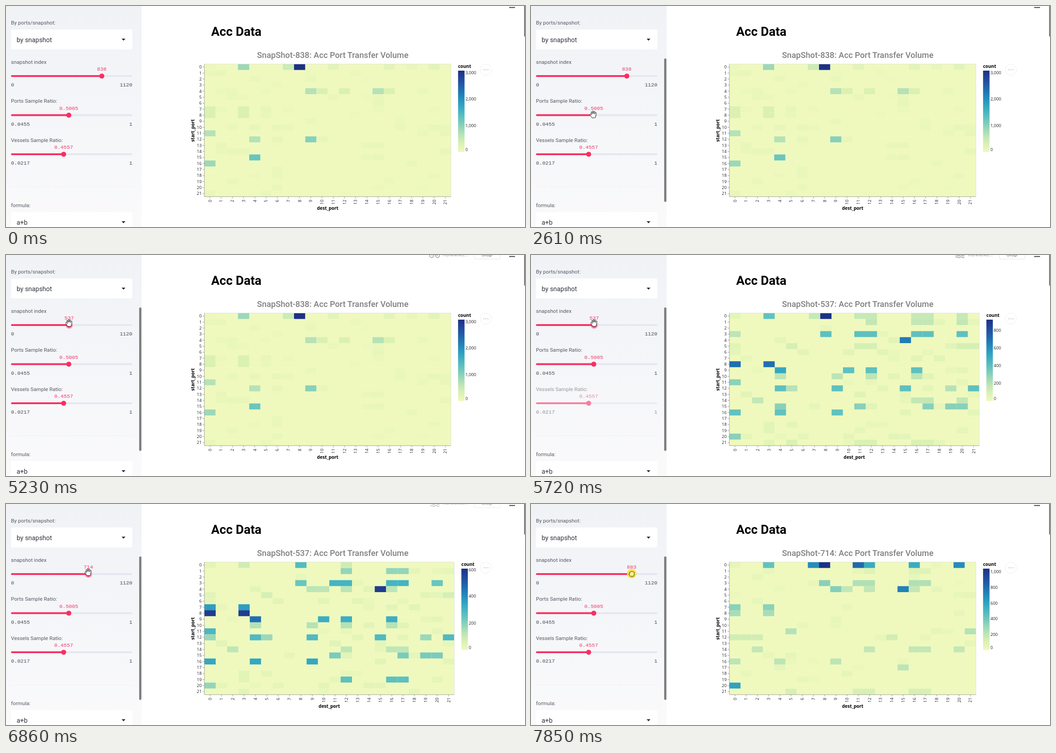
Write an HTML page that moves like this. It is 1146 px wide and 489 px high and loops after 8 s.

```html
<!DOCTYPE html>
<html lang="en">
<head>
<meta charset="utf-8">
<title>Acc Data</title>
<style>
html, body { margin: 0; width: 100%; height: 100%; overflow: hidden; background: #fff; }
svg { display: block; width: 1146px; height: 489px; }
text { font-family: Roboto, sans-serif; white-space: pre; }
.label { font-size: 11.6px; fill: #565863; }
.pick { font-size: 14.4px; fill: #31333f; }
.mono { font: 11.6px "Liberation Mono", monospace; fill: #4b4d58; }
.hot { fill: #ef3a6e; }
.axis text { font: 9.4px "Open Sans", sans-serif; fill: #222; }
.axis text.bold { font-size: 10px; font-weight: 700; fill: #000; }
.mid { text-anchor: middle; }
.end { text-anchor: end; }
</style>
</head>
<body>
<svg id="stage" viewBox="0 0 1146 489"></svg>
<script>
const LOOP = 8000, PINK = '#fa2f62';
const TOP = 128.4, LEFT = 438, N = 22, ROW = 13.34, BOTTOM = TOP + N * ROW;
const RAMP = ['#eff9bd', '#dbf1b4', '#bde5b5', '#94d5b9', '#69c5be', '#45b4c2',
  '#2c9ec0', '#2182b8', '#2163aa', '#23479c', '#1c3185'];

// Ports that trade with each other most; every lane is [strength, start, destinations]
const HUB = [12, 16, 17], EAST = [11, ...HUB], GATE = [0, 3], RING = [4, 9, 15, 21];
const CHARTS = [
  { at: 0, snap: 838, max: 3077, step: 1000, right: 982.5, faint: .03, lanes: [
    [.1, 4, [9, 10, ...HUB.slice(0, 2), 15]], [.22, 4, [9, 15]], [.1, 7, GATE], [.1, 8, GATE],
    [.06, 0, [11, 16, 20]], [.15, 0, [7]], [.28, 0, [3]], [1, 0, [8]], [.22, 11, [0]],
    [.22, 12, [4]], [.33, 12, [9]], [.4, 15, [4]], [.28, 16, [0]]] },
  { at: 5320, snap: 537, max: 922, step: 200, right: 989.8, faint: .06, lanes: [
    [.17, 0, [7, ...EAST, 20]], [.42, 0, [3]], [1, 0, [8]], [.18, 1, [...HUB, 20]],
    [.43, 3, [8, ...EAST, 20]], [.2, 3, [0]], [.72, 4, [15]], [.12, 5, [5, 11, 12, 20, 21]],
    [.76, 8, GATE], [.43, 9, [10, 12, 16]], [.56, 9, [4]], [.2, 10, [4, 9, 12, 16]],
    [.32, 11, [0]], [.22, 12, [5, 19]], [.43, 12, RING], [.18, 14, [2, 16, 17, 20]],
    [.33, 15, [4, 11, 17, 19, 20]], [.42, 16, [0, 4, 9]], [.33, 20, [0]], [.1, 21, [5, ...EAST]]] },
  { at: 6640, snap: 537, max: 605, step: 200, right: 989.8, faint: .06, lanes: [
    [.14, 0, [3, 12]], [.46, 0, [8]], [.3, 1, HUB], [.5, 3, EAST], [.4, 3, [8, 20]],
    [.2, 4, [9, 10, 12, 16]], [.95, 4, [15]], [.12, 5, [5, 21]], [.6, 7, GATE], [.95, 8, GATE],
    [.53, 9, [10, 12, 16]], [.76, 9, [4]], [.22, 10, [4, 9, 12, 16]], [.48, 11, [0]],
    [.28, 12, [0, 5, 19]], [.47, 12, RING], [.19, 14, [2, ...HUB]], [.36, 15, [11, 17, 19, 20]],
    [.56, 16, [0, 4, 9]], [.43, 19, HUB], [.3, 20, [0]]] },
  { at: 7010, snap: 714, max: 1040, step: 200, right: 982.5, faint: .04, lanes: [
    [.42, 0, [3]], [.66, 0, [7, 20]], [.54, 0, [12, 16]], [.78, 0, [11]], [1, 0, [8]],
    [.08, 1, HUB], [.23, 3, EAST], [.33, 3, [8]], [.18, 4, [10, 12, 16]], [.34, 4, [9]],
    [.7, 4, [15]], [.32, 7, GATE], [.25, 8, GATE], [.22, 11, [5, 21]], [.13, 12, [0, 1, 2, 14]],
    [.18, 14, [2, ...HUB, 20]], [.2, 16, [0, 4, 9]], [.2, 17, [15]], [.58, 20, [0]],
    [.11, 21, [5, ...EAST]]] },
];

// Key points [start, end, ...values]; motion advances once per BEAT
const BEAT = 72;
const MOVES = [
  [620, 920, 169.5, 246.5], [1140, 1390, 151.5, 245], [1450, 1860, 139, 239.5],
  [2540, 2610, 137.5, 240], [3380, 3990, 210, 153], [4610, 4850, 140, 154], [5070, 5070, 139, 150.5],
  [5920, 6390, 178, 152], [6510, 6700, 181.5, 151], [7160, 7850, 222.5, 154],
];
const DRAGS = [[4610, 4850, 537], [6330, 6330, 549], [6510, 6700, 714], [7160, 7850, 883]];
const PRESSES = [[4410, 5070], [5920, 6760], [7160, LOOP]];
const RUNS = [[5070, 6700], [6760, 7500]];

const clamp = (v, lo = 0, hi = 1) => Math.min(hi, Math.max(lo, v));
const within = (list, t) => list.find(([a, b]) => t >= a && t < b);
const txt = (x, y, s, cls = '', more = '') => `<text x="${x}" y="${y}" class="${cls}" ${more}>${s}</text>`;
const box = (x, y, w, h, fill, r = 0, more = '') =>
  `<rect x="${x}" y="${y}" width="${w}" height="${h}" rx="${r}" fill="${fill}" ${more}/>`;

function follow(keys, start, t) {
  let now = start;
  for (const [a, b, ...to] of keys) {
    if (t < a) break;
    const n = Math.round((b - a) / BEAT) + 1;
    const p = t >= b ? 1 : (Math.floor((t - a) / (b - a) * (n - 1)) + 1) / n;
    now = now.map((v, i) => v + (to[i] - v) * p);
  }
  return now;
}

function random(seed) {
  return () => (seed = seed * 16807 % 2147483647) / 2147483647;
}

function shade(v) {
  const p = v * (RAMP.length - 1), i = Math.min(RAMP.length - 2, Math.floor(p));
  const part = (c, k) => parseInt(RAMP[c].substr(1 + 2 * k, 2), 16);
  const mix = [0, 1, 2].map(k => Math.round(part(i, k) + (part(i + 1, k) - part(i, k)) * (p - i)));
  return `rgb(${mix})`;
}

// Sparse faint trade everywhere, then the strong lanes on top
function volumes({ snap, faint, lanes }) {
  const rnd = random(snap);
  const grid = Array.from({ length: N * N }, () => rnd() < .12 ? faint * (.4 + .8 * rnd()) : 0);
  for (const [v, from, to] of lanes) for (const c of to) grid[from * N + c] = v;
  return grid;
}

function slider(y, label, lo, hi, x, value, id) {
  return txt(11, y - 27.5, label, 'label') + box(11, y - 2, 268, 4, '#e4e7f0', 2) +
    box(11, y - 2, x - 11, 4, PINK, 2, `id="${id}Fill"`) +
    `<g id="${id}Knob" transform="translate(${x} ${y})">
      <circle id="${id}Ring" r="8.2" fill="${PINK}" opacity="0"/><circle r="5.6" fill="${PINK}"/></g>` +
    txt(x, y - 12, value, 'mono hot mid', `id="${id}Value"`) +
    txt(11, y + 23, lo, 'mono') + txt(279, y + 23, hi, 'mono end');
}

const select = (y, s) => box(11, y, 268, 44, '#fff', 3) + txt(23.5, y + 28, s, 'pick') +
  `<path d="M255.3 ${y + 20.3}h8.4l-4.2 4.4z" fill="#262730"/>`;

function chart(c) {
  const { snap, max, step, right } = c, w = (right - LEFT) / N;
  let s = box(LEFT, TOP, right - LEFT, N * ROW, RAMP[0], 0, 'opacity=".6"');
  s += volumes(c).map((v, i) =>
    box((LEFT + i % N * w).toFixed(2), (TOP + Math.floor(i / N) * ROW).toFixed(2), w.toFixed(2), ROW, shade(v))).join('');
  s += `<path d="M${LEFT} ${TOP}H${right}V${BOTTOM}" fill="none" stroke="#ddd" stroke-width=".8"/>`;
  let ticks = `M${LEFT} ${TOP}V${BOTTOM}H${right}`;
  for (let i = 0; i < N; i++) {
    const x = LEFT + (i + .5) * w, y = TOP + (i + .5) * ROW;
    ticks += `M${LEFT} ${y}h-4M${x} ${BOTTOM}v4`;
    s += txt(432, y + 3.2, i, 'end') + txt(0, 0, i, 'end', `transform="translate(${x + 3.3} 428.5) rotate(-90)"`);
  }
  s += `<path d="${ticks}" fill="none" stroke="#888" stroke-width=".8"/>`;
  s += txt(0, 0, 'start_port', 'bold mid', 'transform="translate(416 275.5) rotate(-90)"');
  s += txt((LEFT + right) / 2, 451, 'dest_port', 'bold mid');
  const lx = right + 15.7;
  s += txt(lx, 137, 'count', 'bold') + box(lx, 143, 14.3, 180, 'url(#ramp)');
  for (let v = 0; v <= max; v += step)
    s += txt(lx + 16.2, clamp(323 - v / max * 180, 146, 318) + 3.4, v.toLocaleString('en-US'));
  return `<g class="axis">${s}</g>` + txt(721.5, 115, `SnapShot-${snap}: Acc Port Transfer Volume`, 'mid',
    'font-size="18.2" font-weight="500" fill="#808080"');
}

const stops = RAMP.map((c, i) => `<stop offset="${i / 10}" stop-color="${c}"/>`).join('');
document.getElementById('stage').innerHTML = `
<defs>
  <linearGradient id="ramp" x1="0" y1="1" x2="0" y2="0">${stops}</linearGradient>
  <linearGradient id="side" x1="0" y1="0" x2="0" y2="1">
    <stop offset="0" stop-color="#f0f2f6"/><stop offset="1" stop-color="#fafafb"/></linearGradient>
</defs>
${box(0, 0, 1146, 489, '#fff')}${box(0, 0, 299.5, 489, 'url(#side)')}
${txt(11, 41, 'By ports/snapshot:', 'label')}${select(52, 'by snapshot')}
${slider(155, 'snapshot index', '0', '1120', 211.5, '838', 'snap')}
${slider(241.5, 'Ports Sample Ratio:', '0.0455', '1', 138.6, '0.5005', 'ports')}
<g id="vessels">${slider(328, 'Vessels Sample Ratio:', '0.0217', '1', 127.3, '0.4557', 'ves')}</g>
<g id="formula">${box(11, 399, 268, 1, '#f1f2f5')}${txt(11, 445, 'formula:', 'label')}${select(456, 'a+b')}</g>
${box(294, 116, 5, 317.5, '#808080', 2.5, 'id="bar"')}
${txt(453, 66, 'Acc Data', '', 'font-size="27.6" font-weight="700" fill="#000"')}
${CHARTS.map(c => `<g class="chart">${chart(c)}</g>`).join('')}
<g id="menu"><circle cx="1059.5" cy="141" r="12.2" fill="#fff" stroke="#aaa" stroke-width=".9"/>
  ${[-4.5, 0, 4.5].map(d => `<circle cx="${1059.5 + d}" cy="141" r="1.5" fill="#555"/>`).join('')}</g>
<g id="run">
  <g fill="none" stroke="#999" stroke-width="1.4">
    <path id="waves" d="${[-3, 1, 5].map(y => `M937 ${y}q2.5 -2 5 0t5 0t5 0t5 0`).join('')}"/>
    <g id="bike"><circle cx="939.7" cy="1.6" r="4.2"/><circle cx="953" cy="1.6" r="4.2"/>
      <path d="M940 1l3.5-4h6l3.5 4.5M947 1l3-5"/></g>
  </g>
  ${txt(965, 3.2, 'RUNNING...', '', 'font-size="10.6" fill="#a3a5ab"')}
  ${box(1034, -14, 57, 23, '#fff', 3, 'stroke="#e0e1e5" stroke-width=".9"')}
  ${txt(1050, 3, 'Stop', '', 'font-size="11.7" fill="#777982"')}
</g>
${box(1111, 2.6, 13, 1.6, '#262730', .5)}${box(1144, 0, 2, 67.5, '#777')}
<g id="cursor" stroke="#222" stroke-linejoin="round" fill="#fff">
  <path id="arrow" d="M0 0V14L3.2 11L5.4 16.2L7.6 15.2L5.4 10.2H9.8Z"/>
  <path id="open" d="M-3 7.5C-4 5-6.5 2-7.3 .3C-7.8-1-6-1.6-5-.6L-3.6 1L-4.9-4.6C-5.2-6.2-3.4-6.7-2.9-5.2L-1.8-1.5L-1.7-6.8C-1.7-8.4 .2-8.4 .3-6.8L.6-1.6L1.8-6.2C2.2-7.6 4-7.2 3.8-5.7L3.2-1L4.9-3.8C5.7-5 7.2-4.2 6.8-2.9C6 0 5.6 4 4.2 7.5Z"/>
  <g id="grab"><circle r="10.7" fill="#f5e638" fill-opacity=".85" stroke="none"/>
    <path fill="#faf08a" d="M-3 6C-4 4.5-6 2.5-6 .5C-6-1-4.8-1.2-4.2-.6C-4.8-3.8-3-4.6-2.2-3.8C-1.6-5.2 0-5.2 .6-4.2C1.4-5 2.8-4.8 3.2-3.6C4.4-4.2 5.8-3.4 5.6-1.6C5.4 1 5 4 4 6Z"/></g>
</g>`;

const $ = id => document.getElementById(id);
const set = (id, name, v) => $(id).setAttribute(name, v);
const show = (id, on) => set(id, 'visibility', on ? 'inherit' : 'hidden');
const charts = [...document.querySelectorAll('.chart')];

function draw(t) {
  const current = CHARTS.filter(c => t >= c.at).length - 1;
  charts.forEach((g, i) => g.style.display = i === current ? '' : 'none');

  const [value] = follow(DRAGS, [838], t), knob = 11 + value / 1120 * 268;
  set('snapFill', 'width', knob - 11);
  set('snapKnob', 'transform', `translate(${knob} 155)`);
  set('snapValue', 'x', knob);
  $('snapValue').textContent = Math.round(value);
  set('snapRing', 'opacity', t >= PRESSES[0][0] ? .45 : 0);

  const [x, y] = follow(MOVES, [594.5, 364], t);
  const held = !!within(PRESSES, t);
  const near = Math.hypot(x - 138.6, y - 241.5) < 9 || Math.hypot(x - knob, y - 155) < 9;
  set('cursor', 'transform', `translate(${x} ${y})`);
  show('cursor', t >= 470);
  show('grab', held);
  show('open', !held && near);
  show('arrow', !held && !near);
  show('bar', t >= 470 && x < 299);
  set('menu', 'opacity', .22 + .4 * clamp(1 - Math.abs(t - 750) / 150));

  const back = clamp((t - 6510) / 190);
  const stale = from => 1 - .5 * clamp((t - from) / 200) * (1 - back);
  set('vessels', 'opacity', stale(5560));
  set('formula', 'opacity', stale(5920));

  const run = within(RUNS, t);
  show('run', run);
  if (run) {
    const p = clamp((t - run[0]) / 160);
    set('run', 'opacity', p);
    set('run', 'transform', `translate(0 ${2 * (p - 1)})`);
    const swim = t % 1000 > 600;
    show('waves', swim);
    show('bike', !swim);
  }
}

const begin = performance.now();
function tick() {
  draw((performance.now() - begin) % LOOP);
  requestAnimationFrame(tick);
}
tick();
</script>
</body>
</html>
```
